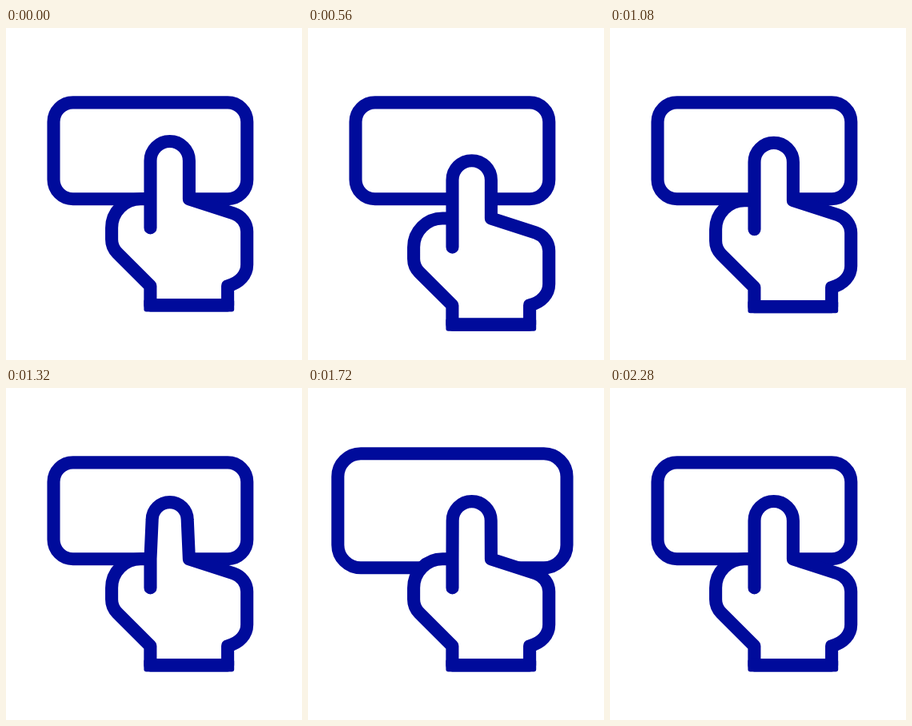
Write an HTML page that moves like this. It is 370 by 416 pixels and loops after 3000 ms.

```html
<!DOCTYPE html>
<html lang="en">
<head>
<meta charset="utf-8">
<title>Button press</title>
<style>
  html, body { margin: 0; width: 100%; height: 100%; overflow: hidden; background: #fff; }
  svg { display: block; width: 100vw; height: 100vh; }
  .line { fill: #fff; stroke: #000b9b; stroke-width: 16.1; stroke-linecap: round; stroke-linejoin: round; }
  .base { fill: #000b9b; }
</style>
</head>
<body>
<svg viewBox="0 0 370 416">
  <rect id="button" class="line"/>
  <g id="hand">
    <path id="outline" class="line"/>
    <rect class="base" x="172.4" y="339.4" width="112.8" height="16.1" rx="3"/>
  </g>
</svg>
<script>
const LOOP = 3000, STEP = 40;
const [button, hand, outline] = ['button', 'hand', 'outline'].map(id => document.getElementById(id));

// Same curve as cubic-bezier(.5, 0, .5, 1)
function ease(x) {
  if (x <= 0) return 0;
  if (x >= 1) return 1;
  let lo = 0, hi = 1;
  for (let i = 0; i < 24; i++) {
    const s = (lo + hi) / 2;
    if (1.5 * s * (1 - s) + s ** 3 < x) lo = s; else hi = s;
  }
  return lo * lo * (3 - 2 * lo);
}

const ramp = (t, from, to) => ease((t - from) / (to - from));
const pulse = (t, a, b, c, d) => ramp(t, a, b) - ramp(t, c, d);

function setAttrs(el, attrs) {
  for (const name in attrs) el.setAttribute(name, attrs[name]);
}

function handPath(squeeze) {
  const r = 24.2 - squeeze, y = 166.2 - squeeze / 2;
  return `M180.5 250.4V214L${204.7 - r} ${y}A${r} ${r} 0 0 1 ${204.7 + r} ${y}L228.9 214.3
    L284.5 232.3C294.3 235.5 301.2 244.6 301.2 255V296.5C301.2 309 292 319.5 277.1 323.2
    V347.4H180.4V323.2L139.2 282C134.6 277.4 132.1 271.4 132.1 265V250.5
    C132.1 230.5 148.2 214.3 168.2 214.3H180.5`;
}

function draw(t) {
  const drop = 24.2 * pulse(t, 0, 560, 640, 1200);
  const squeeze = 6 * pulse(t, 1200, 1480, 1480, 1760);
  const scale = 1 + 0.188 * pulse(t, 1440, 1760, 1760, 2280);
  const w = 241.8 * scale, h = 120.8 * scale;

  setAttrs(button, { x: 180.4 - w / 2, y: 153.8 - h / 2, width: w, height: h, rx: 24.2 * scale });
  setAttrs(hand, { transform: `translate(0 ${drop})` });
  setAttrs(outline, { d: handPath(squeeze) });
}

const start = performance.now();
function tick() {
  const t = (performance.now() - start) % LOOP;
  draw(Math.floor(t / STEP) * STEP);
  requestAnimationFrame(tick);
}
draw(0);
requestAnimationFrame(tick);
</script>
</body>
</html>
```
